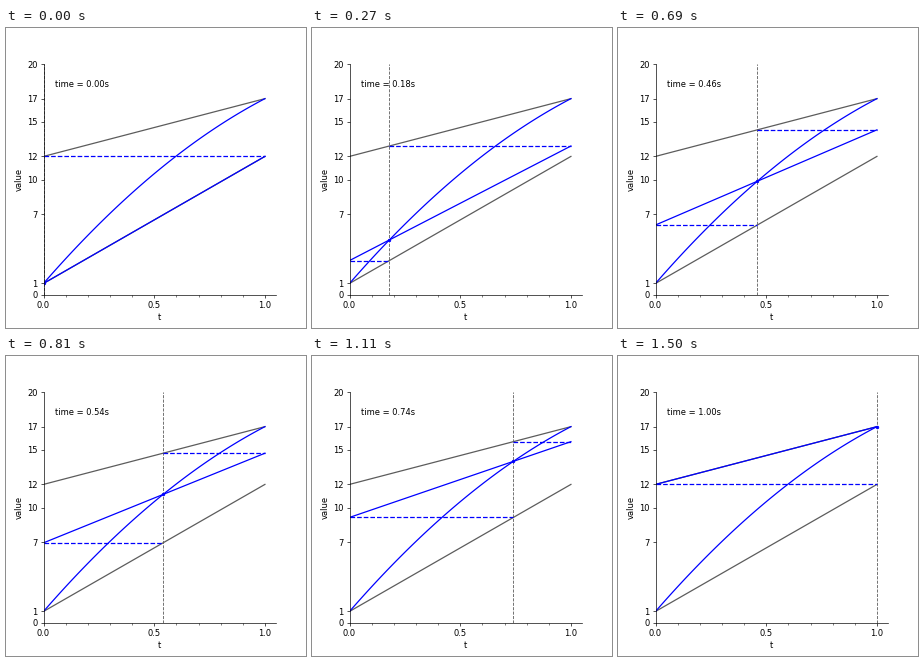
A matplotlib script for the animation above (1530 ms loop, 300 px wide and 300 px high).

```python
import numpy as np
import matplotlib.pyplot as plt
from matplotlib.animation import FuncAnimation
from matplotlib.ticker import MultipleLocator

P0, P1, P2 = 1, 12, 17
STEPS = 50
INTERVAL = 30
GRAY = "#5c5c5c"


def lerp(a, b, t):
    return a + (b - a) * t


fig, ax = plt.subplots(figsize=(5, 5), dpi=60)
ax.set(xlim=(0, 1.05), ylim=(0, 20), xlabel="t", ylabel="value")
ax.set_xticks([0, 0.5, 1])
ax.xaxis.set_minor_locator(MultipleLocator(0.1))
ax.set_yticks([0, P0, 7, 10, P1, 15, P2, 20])
ax.spines[["top", "right"]].set_visible(False)

# Control segments and the quadratic curve they define
ax.plot([0, 1], [P0, P1], color=GRAY)
ax.plot([0, 1], [P1, P2], color=GRAY)
ts = np.linspace(0, 1, 101)
ax.plot(ts, lerp(lerp(P0, P1, ts), lerp(P1, P2, ts), ts), "b")

cursor = ax.axvline(0, color=GRAY, ls="--", lw=1)
low_guide, = ax.plot([], [], "b--")
high_guide, = ax.plot([], [], "b--")
blend, = ax.plot([], [], "b")
dot, = ax.plot([], [], "b.")
label = ax.text(0.05, 0.9, "", transform=ax.transAxes)


def update(i):
    t = i / STEPS
    low, high = lerp(P0, P1, t), lerp(P1, P2, t)
    cursor.set_xdata([t, t])
    low_guide.set_data([0, t], [low, low])
    high_guide.set_data([t, 1], [high, high])
    blend.set_data([0, 1], [low, high])
    dot.set_data([t], [lerp(low, high, t)])
    label.set_text(f"time = {t:.2f}s")
    return cursor, low_guide, high_guide, blend, dot, label


anim = FuncAnimation(fig, update, frames=STEPS + 1, interval=INTERVAL,
                     repeat=True, repeat_delay=0)
plt.show()
```
